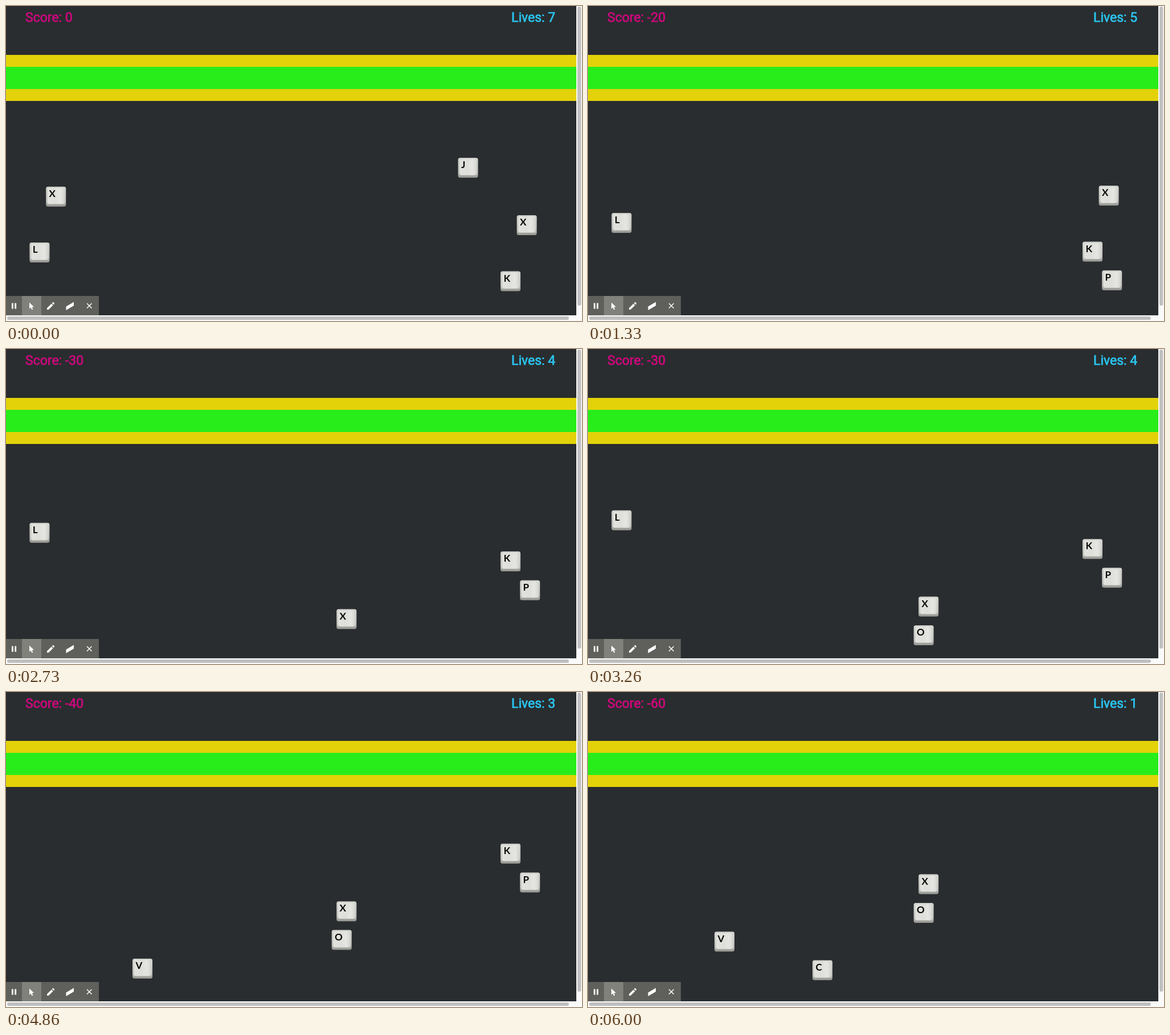
An HTML page for the animation above (6060 ms loop, 1011x554 px).

```html
<!DOCTYPE html>
<html lang="en">
<head>
<meta charset="utf-8">
<title>Typing game</title>
<style>
  html, body { margin: 0; width: 100%; height: 100%; overflow: hidden; background: #292d2f; }
  svg { display: block; width: 1011px; height: 554px; }
  .hud { font: 23px Roboto, sans-serif; stroke-width: .7px; }
  .score { fill: #cf087e; stroke: #cf087e; }
  .lives { fill: #2bc6f2; stroke: #2bc6f2; }
  .letter { font: bold 17px Lato, sans-serif; fill: #080808; }
</style>
</head>
<body>
<svg viewBox="0 0 1011 554">
  <defs>
    <linearGradient id="rim" x2="0" y2="1">
      <stop offset="0" stop-color="#d6d6d2"/>
      <stop offset=".75" stop-color="#c2c2be"/>
      <stop offset="1" stop-color="#949490"/>
    </linearGradient>
    <linearGradient id="face">
      <stop offset="0" stop-color="#e2e2df"/>
      <stop offset=".45" stop-color="#dededa"/>
      <stop offset=".75" stop-color="#e5e5e2"/>
      <stop offset="1" stop-color="#d6d6d2"/>
    </linearGradient>
    <g id="cap">
      <rect width="35" height="35" rx="3.5" fill="url(#rim)"/>
      <path d="M1 31.5H34V32Q34 34.5 31.5 34.5H3.5Q1 34.5 1 32Z" fill="#9d9d99"/>
      <rect x="2.5" y="1.5" width="30" height="29" rx="3" fill="url(#face)" stroke="#c9c9c5" stroke-width=".8"/>
    </g>
  </defs>

  <rect width="1011" height="554" fill="#292d2f"/>
  <rect y="86" width="1001" height="81" fill="#e3d209"/>
  <rect y="107" width="1001" height="39" fill="#28ed1a"/>

  <text id="score" class="hud score" x="34" y="27.8"></text>
  <text id="lives" class="hud lives" x="887" y="27.8"></text>
  <g id="keys"></g>

  <g id="toolbar" fill="#fff">
    <rect y="510" width="163" height="34" fill="#5f605b"/>
    <rect x="28" y="510" width="34" height="34" fill="#80817b"/>
    <path d="M10 522.5h2.8v10H10zM15.3 522.5h2.8v10h-2.8z"/>
    <path d="M41 521.5v11l2.6-2.2 1.8 4 1.9-.9-1.8-3.8 3.5-.3z"/>
    <path d="M72 534v-2.8l7.8-7.8 2.8 2.8-7.8 7.8zM80.7 522.5l1.4-1.4q.6-.5 1.200 0l1.6 1.600q.5.6 0 1.200l-1.400 1.400z"/>
    <path d="M105.500 528.500l13.500-8v6.500l-13.500 8z"/>
    <path d="M142 523l8.500 8.500M150.500 523l-8.500 8.500" fill="none" stroke="#fff" stroke-width="1.500"/>
  </g>

  <g id="scrollbars">
    <path d="M1001 0h10v554H0v-10h1001z" fill="#fafafa"/>
    <rect x="1003" y="1" width="6.500" height="526" rx="3.250" fill="#c1c1c1"/>
    <rect x="2" y="546" width="986" height="6" rx="3" fill="#bfbfbf"/>
  </g>
</svg>
<script>
const LOOP = 6060;
const SPAWN_Y = 506.4;

// Steps at which the topmost key is missed.
const misses = [1, 19, 37, 55, 74, 90];

// Letter, x and virtual y at the start, in order of removal.
const keys = [
  ['J', 793.5, 267], ['X', 70.2, 317.7], ['X', 896.6, 368], ['L', 41.4, 416],
  ['K', 868, 466.4], ['P', 902.2, 517], ['X', 580.2, 567.8], ['O', 571.7, 618.2],
  ['V', 222, 668.7], ['C', 394, 719]
];

// Distance risen at given steps.
const rise = [[0, 0], [10, 24], [20, 52], [32, 85.7], [49, 132.2], [62, 168.6], [73, 199.6], [90, 247.2]];

const byId = id => document.getElementById(id);

function make(tag, attrs, parent) {
  const el = document.createElementNS('http://www.w3.org/2000/svg', tag);
  for (const name in attrs) el.setAttribute(name, attrs[name]);
  return parent.appendChild(el);
}

const nodes = keys.map(([letter]) => {
  const g = make('g', {}, byId('keys'));
  make('use', { href: '#cap' }, g);
  make('text', { class: 'letter', x: 5.4, y: 18.3 }, g).textContent = letter;
  return g;
});

function risen(step) {
  const i = Math.max(1, rise.findIndex(([s]) => s >= step));
  const [s0, d0] = rise[i - 1], [s1, d1] = rise[i];
  return d0 + (d1 - d0) * (step - s0) / (s1 - s0);
}

// Fifteen steps per second, with step starts cut to 10 ms.
const stepAt = ms => Math.ceil((Math.floor(ms / 10) + 1) * 0.15 - 1e-6) - 1;

function draw(ms) {
  const step = Math.min(90, stepAt(ms % LOOP));
  const lift = risen(step);
  const missed = misses.filter(m => m <= step).length;
  keys.forEach(([, x, startY], i) => {
    const y = startY - lift;
    nodes[i].setAttribute('transform', `translate(${x} ${y.toFixed(2)})`);
    nodes[i].setAttribute('visibility', i >= missed && y <= SPAWN_Y ? 'visible' : 'hidden');
  });
  byId('score').textContent = `Score: ${missed ? -10 * missed : 0}`;
  byId('lives').textContent = `Lives: ${7 - missed}`;
}

const start = performance.now();
function tick() {
  draw(performance.now() - start);
  requestAnimationFrame(tick);
}
tick();
</script>
</body>
</html>
```
